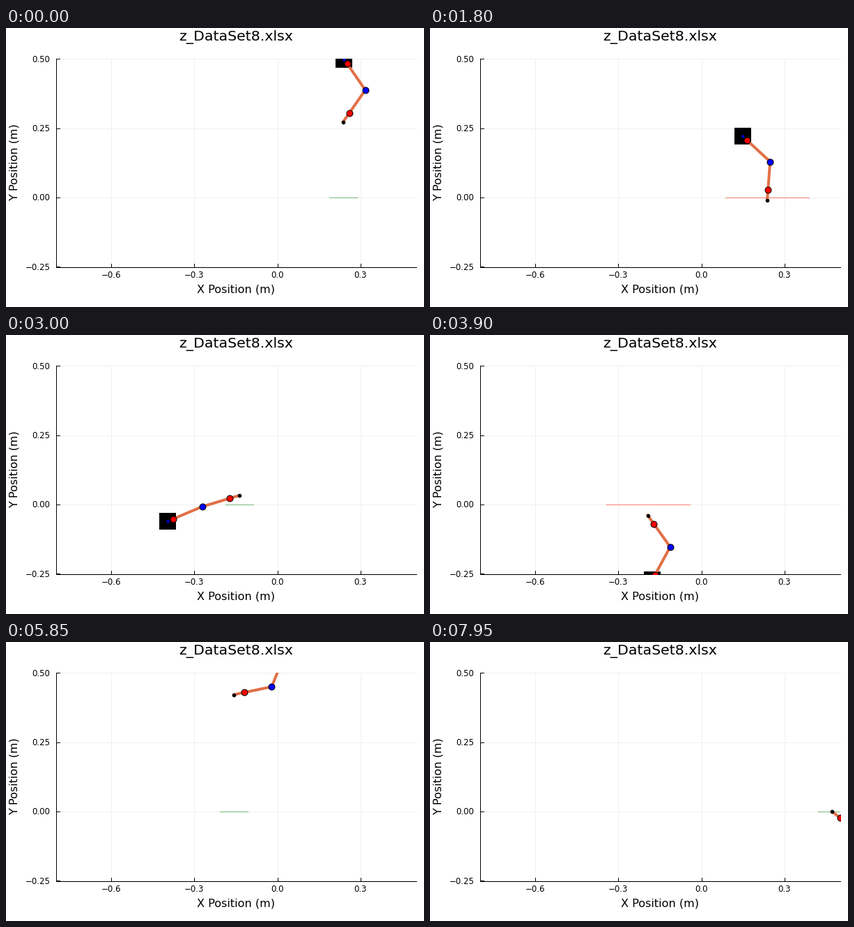
Recreate the animation shown at these times as a matplotlib script. Size 600 by 400 pixels, loop 8 s.

```python
import numpy as np
import matplotlib.pyplot as plt
from matplotlib.animation import FuncAnimation
from matplotlib.patches import Rectangle

W, H, DPI = 600, 400, 100
FRAMES, STEP = 160, 50
LEFT, RIGHT, TOP, BOTTOM, GROUND = 71.5, 588.5, 44, 342.5, 243
PT = 72 / DPI
THIGH, SHANK = 54, 55.6

# time (s), body x, body y, toe x, toe y
KEYS = np.array([
    (0, 485, 44.5, 484, 134.5), (.85, 485, 101.6, 484, 191.6),
    (1.15, 485, 149, 484, 239), (1.4, 481, 171, 484, 249),
    (1.8, 448.5, 155, 484, 247), (2.1, 394, 163, 475, 236),
    (2.55, 310.5, 199, 418, 214), (3.0, 232, 267, 335, 230),
    (3.15, 214, 286, 315, 245), (3.4, 224, 306, 312.5, 254),
    (3.9, 319, 351.3, 312.5, 258.5), (4.12, 416, 245, 309, 246),
    (4.25, 355, 163, 312, 243.4), (4.52, 206, 210, 310, 243.4),
    (4.87, 258, 139, 302, 239), (5.05, 282.3, 105.3, 300, 203.5),
    (5.4, 336, 52.7, 300, 147), (5.85, 401.5, 14, 327, 75.5),
    (6.8, 525, 37, 434, 75), (7.65, 632, 178, 542, 178),
    (7.95, 668, 252, 577, 242.9)])
TIMES, PLACES = KEYS[:, 0], KEYS[:, 1:]
SLOPES = np.gradient(PLACES, TIMES, axis=0, edge_order=2)


def place(t):
    """Cubic Hermite position of body and toe."""
    i = min(max(np.searchsorted(TIMES, t, "right") - 1, 0), len(TIMES) - 2)
    h = TIMES[i + 1] - TIMES[i]
    u = (t - TIMES[i]) / h
    p = ((1 + 2 * u) * (1 - u) ** 2 * PLACES[i]
         + u * (1 - u) ** 2 * h * SLOPES[i]
         + u * u * (3 - 2 * u) * PLACES[i + 1]
         + u * u * (u - 1) * h * SLOPES[i + 1])
    return p[:2], p[2:]


def pose(t):
    body, toe = place(t)
    span = np.hypot(*(toe - body))
    u = (toe - body) / span
    reach = THIGH + SHANK
    if span > reach:
        span, toe = reach, body + reach * u
    along = (THIGH ** 2 - SHANK ** 2 + span ** 2) / (2 * span)
    out = np.sqrt(max(THIGH ** 2 - along ** 2, 0))
    side = 1 if 3.0 < t < 4.12 else -1
    knee = body + along * u + side * out * np.array([-u[1], u[0]])
    hip = body + .155 * (knee - body)
    ankle = knee + .73 * (toe - knee)
    return body, hip, knee, ankle, toe


plt.rcParams["font.family"] = "DejaVu Sans"
fig = plt.figure(figsize=(W / DPI, H / DPI), dpi=DPI, facecolor="white")
ax = fig.add_axes([0, 0, 1, 1])
ax.set(xlim=(0, W), ylim=(H, 0))
ax.axis("off")


def label(x, y, s, size, **kw):
    ax.text(x, y, s, fontsize=size * PT, va="baseline", **kw)


def stroke(xs, ys, color="black", width=1, z=1):
    return ax.plot(xs, ys, color=color, lw=width * PT, zorder=z)[0]


label(329.7, 18, "z_DataSet8.xlsx", 20.5, ha="center")
label(330.5, 379, "X Position (m)", 16.1, ha="center")
label(17, 192.5, "Y Position (m)", 16.1, ha="center", rotation=90,
      rotation_mode="anchor")
for v in (-.6, -.3, 0, .3):
    x = 389.5 + 397.3 * v
    stroke([x, x], [TOP, BOTTOM], "#f0f0f0", z=0)
    stroke([x, x], [BOTTOM, BOTTOM - 5])
    label(x, 358.3, f"{v:.1f}".replace("-", "\u2212"), 11.7, ha="center")
for v in (-.25, 0, .25, .5):
    y = GROUND - 397.5 * v
    stroke([LEFT, RIGHT], [y, y], "#f0f0f0", z=0)
    stroke([LEFT, LEFT + 5], [y, y])
    label(63.5, y + 4.3, f"{v:.2f}".replace("-", "\u2212"), 11.7, ha="right")
stroke([LEFT, LEFT], [TOP, BOTTOM])
stroke([LEFT, RIGHT], [BOTTOM, BOTTOM])

window = Rectangle((LEFT, TOP), RIGHT - LEFT, BOTTOM - TOP,
                   transform=ax.transData)


def joint(color, size, z):
    return ax.plot([], [], "o", color=color, ms=size * PT, mec="black",
                   mew=PT, zorder=z)[0]


ground = stroke([], [], width=1.4, z=2)
box = ax.add_patch(Rectangle((0, 0), 24, 24, color="black", lw=0, zorder=3))
leg = stroke([], [], "#e26f46", 4, 4)
dots = [joint("blue", 5, 5), joint("red", 9, 6), joint("blue", 9, 6),
        joint("red", 9, 6), joint("black", 4.6, 6)]
parts = [ground, box, leg, *dots]
for part in parts:
    part.set_clip_path(window)


def draw(n):
    points = pose(n * STEP / 1000)
    toe = points[-1]
    touching = toe[1] > GROUND
    half = 60 if touching else 20
    ground.set_data([toe[0] - half, toe[0] + half], [GROUND, GROUND])
    ground.set_color("#f99a90" if touching else "#94c994")
    box.set_xy(points[0] - 12)
    leg.set_data(*np.transpose(points[1:]))
    for dot, (x, y) in zip(dots, points):
        dot.set_data([x], [y])
    return parts


anim = FuncAnimation(fig, draw, frames=FRAMES, interval=STEP, repeat=True,
                     repeat_delay=0, blit=False)
plt.show()
```
